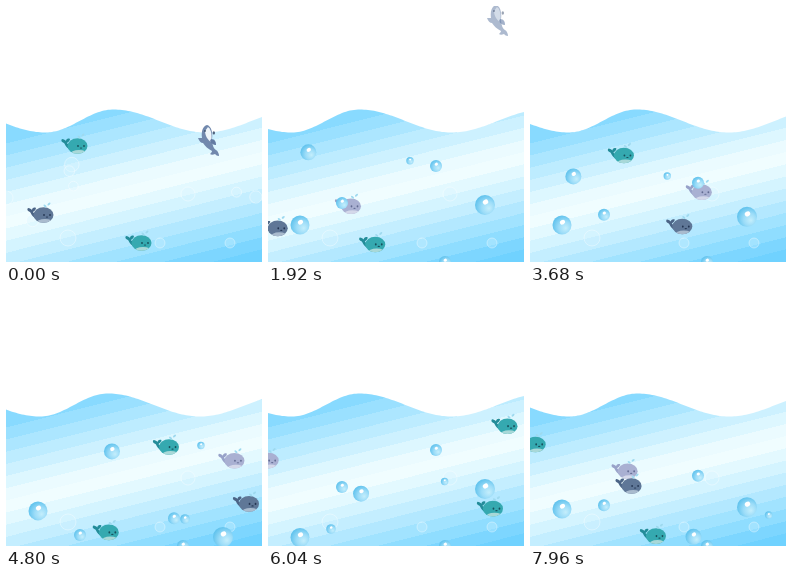
These frames come from a looping animation (256 px wide and 256 px high, 8 s). An HTML page with a canvas:

```html
<!DOCTYPE html>
<html lang="en">
<head>
<meta charset="utf-8">
<title>Whales in the waves</title>
<style>
  html, body { margin: 0; width: 100%; height: 100%; overflow: hidden; background: #fff; }
  canvas { display: block; width: 100vw; height: 100vh; }
</style>
</head>
<body>
<canvas id="stage"></canvas>
<script>
const SIZE = 256, LOOP = 8000, MARGIN = 16;
const canvas = document.getElementById('stage');
const ctx = canvas.getContext('2d');

const TEAL = { body: '#35a9b0', dark: '#238c99', belly: '#a8d8d8', ink: '#174f5b' };
const SLATE = { body: '#5f7797', dark: '#4b6486', belly: '#a9bbce', ink: '#243653' };
const LILAC = { body: '#a9b0d2', dark: '#98a2c9', belly: '#d4d8ea', ink: '#626b92' };

// Every lane swims left to right once per gap; each pass goes [from, to, arc] in height.
const lanes = [
  { look: TEAL, start: 1940, gap: 5710, speed: .0617, passes: [[92, 120, 50], [153, 160, 0]] },
  { look: TEAL, start: 695, gap: 2925, speed: .0985, passes: [[219, 263, 0], [264, 208, 0], [264, 225, 0]] },
  { look: LILAC, start: 10, gap: 5750, speed: .0505, passes: [[202, 155, 15], [168, 200, 0]] },
  { look: SLATE, start: 1634, gap: 4906, speed: .081, passes: [[221, 210, 5], [213, 168, 0]] }
];
const opening = [[69, 139, TEAL], [35, 208, SLATE], [133, 236, TEAL]];

// Floating bubbles rest at a height and sink now and then.
const floats = [
  { x: 168, rest: 160, r: 6, depth: 128, low: 4400, gap: 4200 },
  { x: 74, rest: 197, r: 6, depth: 90, low: 4400, gap: 4200 },
  { x: 217, rest: 199, r: 10, depth: 90, low: 4400, gap: 4200 },
  { x: 32, rest: 219, r: 9.5, depth: 45, low: 5700, gap: 6200 }
];
const risers = [[1000, 2, 207], [2720, 135, 220], [4800, 179, 229], [6040, 63, 239]];
const still = [[62, 232, 8], [154, 237, 5], [224, 237, 5], [182, 188, 7]];

const clamp = v => Math.max(0, Math.min(1, v));
const mix = (a, b, k) => a + (b - a) * k;

function seeded(seed) {
  return () => (seed = seed * 16807 % 2147483647) / 2147483647;
}

function oval(x, y, rx, ry, fill, turn = 0) {
  ctx.beginPath();
  ctx.ellipse(x, y, rx, ry, turn, 0, Math.PI * 2);
  ctx.fillStyle = fill;
  ctx.fill();
}

function shape(d, fill) {
  ctx.fillStyle = fill;
  ctx.fill(new Path2D(d));
}

function placed(x, y, alpha, draw) {
  ctx.save();
  ctx.translate(x, y);
  ctx.globalAlpha = alpha;
  draw();
  ctx.restore();
}

function whale(x, y, look, alpha = 1) {
  placed(x, y, alpha, () => {
    shape('M-4 5C-9 3 -10 -1 -11 -2C-14 -3 -14 -5 -13 -6C-11 -6 -10 -5 -9 -4C-9 -6 -7 -7 -5 -6C-5 -4 -7 -3 -8 -2C-7 0 -5 0 -3 -3Z', look.dark);
    oval(2.5, 1, 10, 7.8, look.body);
    ctx.save();
    ctx.clip();
    oval(4, 9.5, 9, 4.5, look.belly);
    ctx.restore();
    for (const eye of [3, 9]) oval(eye, 1, .9, 1.1, look.ink);
    oval(6, 3, 1.2, .6, look.ink);
    for (const side of [-1, 1]) oval(6 + side * 2, -9 - side, 1.8, 1, '#9ed9ef', -side * .7);
  });
}

function shark(x, y, alpha) {
  placed(x, y, alpha, () => {
    shape('M-2 -15C2 -14 4 -8 3 -1C3 5 5 9 7 10C9 11 10 14 10 16C8 16 7 15 6 14C4 15 2 15 1 14C2 13 3 12 3 11C-1 9 -4 6 -6 3C-8 3 -10 1 -11 -2C-9 -2 -8 -2 -7 -2C-8 -9 -6 -14 -2 -15Z', '#7188ad');
    shape('M-1 -13C3 -10 3 -3 2 2C-1 0 -4 -4 -4 -9Z', '#eff5fa');
    shape('M2 -1C6 -1 7 2 7 5C4 5 2 3 1 1Z', '#637ba3');
    oval(-4, -9, .8, .9, '#293b58');
    oval(4.8, -7, 1.2, 1.7, '#52627d');
  });
}

function bubble(x, y, r) {
  const glow = ctx.createRadialGradient(x + r * .4, y + r * .35, 0, x + r * .2, y + r * .2, r * 1.3);
  glow.addColorStop(0, '#c4eefc');
  glow.addColorStop(.5, '#9bdcf8');
  glow.addColorStop(1, '#5bc0ec');
  oval(x, y, r, r, glow);
  oval(x + r * .05, y - r * .3, r * .28, r * .24, '#fff', -.5);
}

function faintBubble(x, y, r, alpha) {
  placed(x, y, alpha, () => {
    oval(0, 0, r, r, 'rgba(216,245,255,.6)');
    ctx.strokeStyle = 'rgba(255,255,255,.8)';
    ctx.lineWidth = 1;
    ctx.stroke();
  });
}

// Hard-edged bands, blue at both ends and almost white between.
function bandedWater(bands = 16) {
  const water = ctx.createLinearGradient(29, 118, 75, 301);
  for (let i = 0; i < bands; i++) {
    const k = clamp(Math.abs((i + .5) / bands - .45) / .5) ** 1.15;
    const color = `rgb(${mix(243, 112, k)}, ${mix(254, 210, k)}, 255)`;
    water.addColorStop(i / bands, color);
    water.addColorStop((i + 1) / bands, color);
  }
  return water;
}

function sea(t) {
  const swing = Math.cos(t / 4000 * Math.PI * 2);
  const crest = 99.5 + 8 * swing;
  ctx.beginPath();
  ctx.moveTo(0, SIZE);
  for (let x = 0; x <= SIZE; x += 2) {
    // Half waves are 92 wide, except the shorter one left of the crest.
    const d = x - crest;
    const phase = d > 0 ? d / 92 : d > -68 ? d / 68 : (d - 24) / 92;
    ctx.lineTo(x, 115 + 11.5 * -Math.cos(phase * Math.PI));
  }
  ctx.lineTo(SIZE, SIZE);
  ctx.fillStyle = bandedWater();
  ctx.fill();
}

function drawWhales(t) {
  for (const { look, start, gap, speed, passes } of lanes) {
    passes.forEach(([from, to, arc], pass) => {
      const x = (t - start - pass * gap) * speed - MARGIN;
      const k = (x + MARGIN) / (SIZE + 2 * MARGIN);
      if (k >= 0 && k <= 1) whale(x, mix(from, to, k) + arc * Math.sin(k * Math.PI), look);
    });
  }
}

function drawBubbles(t) {
  ctx.globalAlpha = clamp((t - 40) / 400);
  bubble(177, 256, 6);
  for (const { x, rest, r, depth, low, gap } of floats) {
    const away = t - low - gap * Math.round((t - low) / gap);
    bubble(x, rest + depth * Math.exp(-((away / 505) ** 2)), r);
  }
  for (const [time, x, y] of risers) {
    const age = (t - time) / 600;
    if (Math.abs(age) < 1) bubble(x + age * 5, y + age * age * 45, 4.8);
  }
  // Two bubbles wander together while slowly sinking.
  const k = t / LOOP;
  const sway = Math.cos((t - 2500) / 2600 * Math.PI * 2);
  const x = 2 + 142 * k + 25 * sway;
  const y = 147 + 112 * k ** 3 - 13 * sway;
  bubble(x, y, 8);
  bubble(x + 110 - 35 * k, y + 18 - 40 * k, 3.7);
  ctx.globalAlpha = 1;
}

function drawOpening(t) {
  const alpha = 1 - clamp((t - 40) / 400);
  if (!alpha) return;
  const random = seeded(42);
  for (let i = 0; i < 7; i++) faintBubble(random() * SIZE, mix(150, 230, random()), mix(4, 8, random()), alpha * .5);
  for (const [x, y, look] of opening) whale(x, y, look, alpha);
}

function render(t) {
  ctx.setTransform(canvas.width / SIZE, 0, 0, canvas.height / SIZE, 0, 0);
  ctx.fillStyle = '#fff';
  ctx.fillRect(0, 0, SIZE, SIZE);
  sea(t);
  for (const spot of still) faintBubble(...spot, .45);
  drawOpening(t);
  drawWhales(t);
  const leap = clamp(t / 1080);
  shark(203 + 27 * leap, 134 - 120 * leap, 1 - clamp((t - 1500) / 1000));
  drawBubbles(t);
}

function resize() {
  const ratio = window.devicePixelRatio || 1;
  canvas.width = Math.max(1, Math.round(innerWidth * ratio));
  canvas.height = Math.max(1, Math.round(innerHeight * ratio));
}

const begin = performance.now();
function tick() {
  render((performance.now() - begin) % LOOP);
  requestAnimationFrame(tick);
}

addEventListener('resize', resize);
resize();
tick();
</script>
</body>
</html>
```
